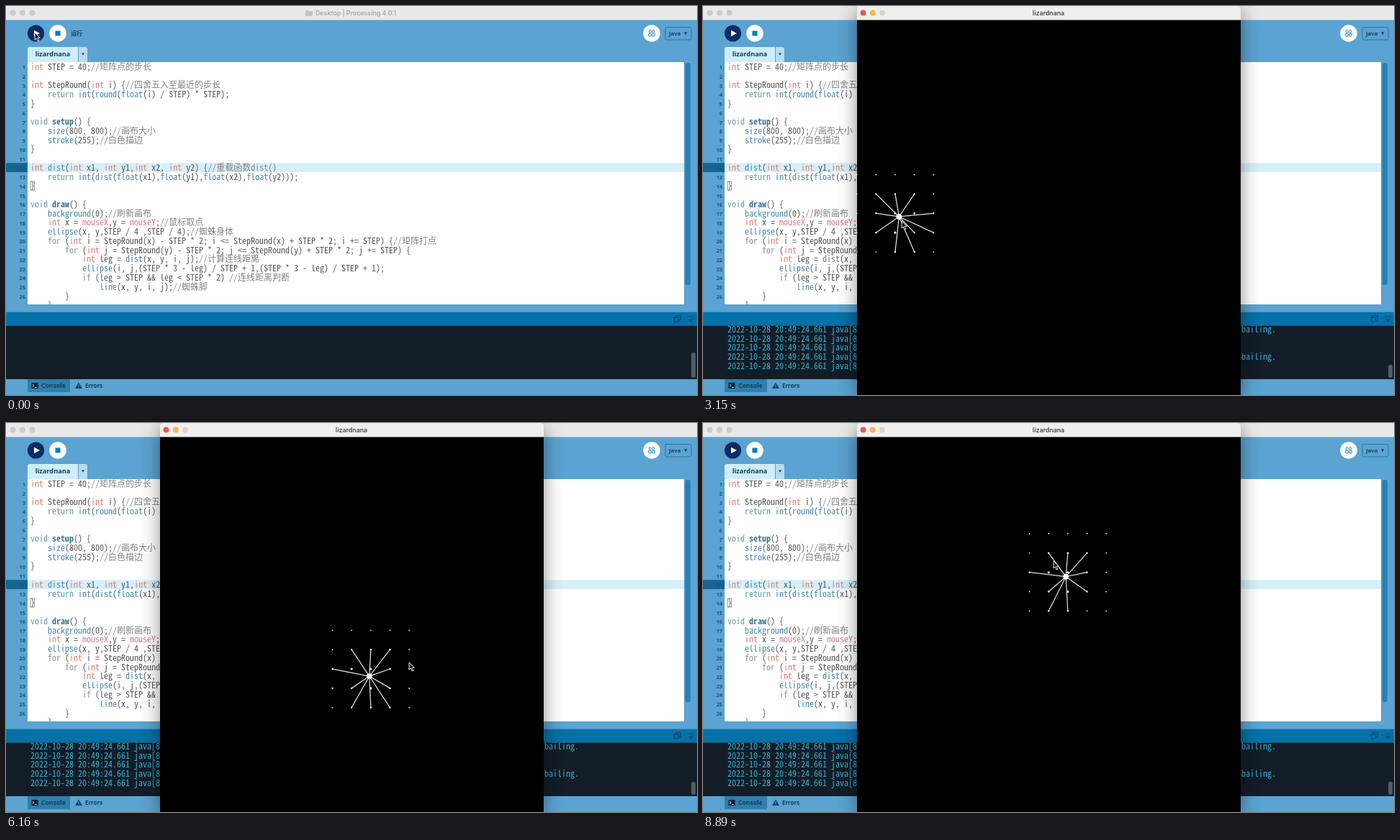
An HTML page for the animation above (8.96 s loop, 960 by 541 pixels).

```html
<!DOCTYPE html>
<html lang="en">
<head>
<meta charset="utf-8">
<title>Spider sketch</title>
<style>
html, body { margin: 0; width: 100%; height: 100%; overflow: hidden; background: #5ba3d1; }
svg { display: block; width: 100%; height: 100%; }
text { white-space: pre; }
.ui { font: 700 8.6px "Open Sans", "Noto Sans CJK SC", sans-serif; fill: #173f61; }
.title { font: 600 8.8px Inter, sans-serif; text-anchor: middle; }
.num { font: 700 7.5px "Open Sans", sans-serif; fill: #1f5378; text-anchor: end; }
.code { font-size: 12px; fill: #565656; }
.cjk { font-family: "Noto Sans CJK SC", "Noto Sans CJK", sans-serif; font-size: 12px; }
.type { fill: #e08170; }
.word { fill: #679ca6; }
.flow { fill: #8d968e; }
.func { fill: #4788ac; }
.main { fill: #41758f; font-weight: 700; }
.var { fill: #d97c8f; }
.note { fill: #838383; }
.log { font-size: 12px; fill: #35b2d3; }
#win { transform-origin: 480px 280px; }
#frame { filter: drop-shadow(0 6px 13px rgba(0, 0, 0, .45)); }
</style>
</head>
<body>
<svg viewBox="0 0 960 541" preserveAspectRatio="none">
  <defs>
    <clipPath id="page"><rect x="30" y="78" width="912" height="337"/></clipPath>
    <clipPath id="view"><rect x="213.5" y="19" width="533.5" height="522"/></clipPath>
  </defs>
  <rect width="960" height="541" fill="#5ba3d1"/>
  <rect width="960" height="19.5" fill="#e9e9e9"/>
  <g fill="#cbcbcb"><circle cx="9.5" cy="9.5" r="4"/><circle cx="23" cy="9.5" r="4"/><circle cx="36.5" cy="9.5" r="4"/></g>
  <path d="M416 6h3.5l1 1.3h5.5v6.7h-10z" fill="#c3c3c3"/>
  <text class="title" x="486" y="12.8" fill="#a9a9a9">Desktop | Processing 4.0.1</text>

  <circle cx="41.5" cy="38" r="11.6" fill="#0b2c63"/>
  <path d="M39 33.8l8 4.2l-8 4.2z" fill="#fff"/>
  <circle cx="72" cy="38" r="11.8" fill="#fff"/>
  <rect x="68.5" y="34.5" width="7" height="7" fill="#0b7dbd"/>
  <text id="hint" class="ui" x="90" y="41.2" style="font-size:8px">运行</text>
  <circle cx="897" cy="38" r="11.8" fill="#fff"/>
  <g fill="none" stroke="#4a9ccc" stroke-width="1.1">
    <rect x="893.5" y="33.5" width="2.6" height="4" rx="1.3"/><rect x="898" y="33.5" width="2.6" height="4" rx="1.3"/>
    <circle cx="894.4" cy="40" r="2"/><circle cx="899.6" cy="40" r="2"/>
  </g>
  <rect x="916" y="29.5" width="36" height="17.5" rx="2" fill="none" stroke="#2b75a4"/>
  <text class="ui" x="921" y="41.2" style="font-size:7.8px">Java</text>
  <path d="M942 36.3h4.4l-2.2 4z" fill="#173f61"/>
  <path d="M30 78v-18q0-3 3-3h67v21z" fill="#d0eefa"/>
  <path d="M101 78v-21h9q3 0 3 3v18z" fill="#b5dcf0"/>
  <path d="M105 65.5h4l-2 3.2z" fill="#173f61"/>
  <text class="ui" x="65" y="70.3" text-anchor="middle" style="font-size:9.2px">lizardnana</text>

  <rect x="30" y="78" width="912" height="337" fill="#fff"/>
  <rect y="218.3" width="30" height="12.7" fill="#14658f"/>
  <rect x="30" y="218.3" width="912" height="12.7" fill="#d6f0fa"/>
  <rect x="34" y="244" width="5.5" height="12" fill="none" stroke="#777" stroke-width=".8"/>
  <rect x="943.5" y="79" width="7.5" height="309" rx="3" fill="#2c7fb1"/>
  <g id="code"></g>

  <rect y="425.7" width="960" height="18.8" fill="#0471a8"/>
  <g fill="none" stroke="#14456a" stroke-width="1.2">
    <rect x="928.5" y="433" width="5.5" height="6"/><path d="M931 433v-2.5h6v6.5h-3M947 432h9M949 436h5l-2.5 3z"/>
  </g>
  <rect y="444.5" width="960" height="75" fill="#131d27"/>
  <g id="log"></g>
  <rect id="thumb" x="952" y="482" width="6" height="35" rx="3" fill="#525c66"/>
  <rect y="519" width="960" height="22" fill="#5ba3d1"/>
  <rect x="30" y="519" width="59" height="18" fill="#2f7fae"/>
  <rect x="35.5" y="524" width="9" height="8" fill="#0d2233"/>
  <path d="M37 526l2 1.8l-2 1.8M40 530.5h3" fill="none" stroke="#d6e8f2" stroke-width=".9"/>
  <text class="ui" x="49" y="531">Console</text>
  <path d="M101 523.5l5 8.5h-10z" fill="#173f61"/>
  <path d="M101 526.5v2.5M101 530v1" stroke="#7cb8dc"/>
  <text class="ui" x="110" y="531" style="font-size:8px">Errors</text>

  <g id="win">
    <path id="frame" d="M214 541V5q0-5 5-5h523q5 0 5 5v536z" fill="#f0efef"/>
    <circle cx="222.5" cy="9.5" r="4" fill="#ea5a4e"/>
    <circle cx="235.8" cy="9.5" r="4" fill="#f5b552"/>
    <circle cx="249" cy="9.5" r="4" fill="#dcd5c8"/>
    <text class="title" x="480" y="12.8" fill="#4a4a4a">lizardnana</text>
    <rect x="214" y="19.5" width="533" height="522" fill="#000"/>
    <g clip-path="url(#view)">
      <path id="legs" fill="none" stroke="#dedede" stroke-width="1.25"/>
      <path id="dots" fill="#fff"/>
    </g>
  </g>
  <path id="mouse" d="M0 0v10l2.3-2l1.8 4l1.8-.8l-1.7-3.9h3.1z" fill="#111" stroke="#fff" stroke-width=".9"/>
</svg>
<script>
const LOOP = 8960, TICK = 70, STEP = 40;
const LOG_AT = 840, OPEN_AT = 980, LEAVE_AT = 1680;
const $ = id => document.getElementById(id);

// half-width face when present, otherwise the same 6px pitch at 10px
const probe = document.createElement('canvas').getContext('2d');
probe.font = '12px "Noto Sans Mono CJK SC", monospace';
const narrow = Math.abs(probe.measureText('M'.repeat(10)).width - 60) < 1;
const mono = narrow ? 'font-family:\'Noto Sans Mono CJK SC\',monospace'
                    : 'font-family:\'Liberation Mono\',monospace;font-size:10px';

const source = `int STEP = 40;//矩阵点的步长

int StepRound(int i) {//四舍五入至最近的步长
    return int(round(float(i) / STEP) * STEP);
}

void setup() {
    size(800, 800);//画布大小
    stroke(255);//白色描边
}

int dist(int x1, int y1,int x2, int y2) {//重载函数dist()
    return int(dist(float(x1),float(y1),float(x2),float(y2)));
}

void draw() {
    background(0);//刷新画布
    int x = mouseX,y = mouseY;//鼠标取点
    ellipse(x, y,STEP / 4 ,STEP / 4);//蜘蛛身体
    for (int i = StepRound(x) - STEP * 2; i <= StepRound(x) + STEP * 2; i += STEP) {//矩阵打点
        for (int j = StepRound(y) - STEP * 2; j <= StepRound(y) + STEP * 2; j += STEP) {
            int leg = dist(x, y, i, j);//计算连线距离
            ellipse(i, j,(STEP * 3 - leg) / STEP + 1,(STEP * 3 - leg) / STEP + 1);
            if (leg > STEP && leg < STEP * 2) //连线距离判断
                line(x, y, i, j);//蜘蛛脚
        }
    }`.split('\n');

const rules = [
  ['note', '//.*'],
  ['func', '\\b(?:int|float)(?=\\()|\\b(?:size|stroke|background|ellipse|line|round|dist)\\b'],
  ['type', '\\bint\\b'],
  ['word', '\\b(?:void|return)\\b'],
  ['flow', '\\b(?:for|if)\\b'],
  ['main', '\\b(?:setup|draw)\\b'],
  ['var', '\\bmouse[XY]\\b']
];
const lexer = new RegExp(rules.map(([name, re]) => `(?<${name}>${re})`).join('|'), 'g');
const escape = s => s.replace(/&/g, '&amp;').replace(/</g, '&lt;');
const span = (cls, s) => `<tspan class="${cls}">${s}</tspan>`;

function paint(line) {
  return escape(line)
    .replace(lexer, (s, ...rest) => {
      const groups = rest[rest.length - 1];
      return span(Object.keys(groups).find(k => groups[k]), s);
    })
    .replace(/[\u4e00-\u9fff]+/g, s => span('cjk', s));
}

$('code').innerHTML = '<g clip-path="url(#page)">' + source.map((line, i) =>
  `<text class="code" style="${mono}" x="34" y="${88.5 + i * 12.76}">${paint(line)}</text>`).join('') + '</g>' +
  source.slice(0, 26).map((_, i) =>
    `<text class="num" x="27" y="${88 + i * 12.76}">${i + 1}</text>`).join('');

const stamp = '2022-10-28 20:49:24.661 java[8213:91467] ';
const long = (stamp + 'The window restoration class could not be found for the saved state archives,').padEnd(119) + 'bailing.';
const short = stamp + 'The window restoration class was requested twice';
$('log').innerHTML = [long, short, short, long, short].map((s, i) =>
  `<text class="log" style="${mono}" x="34" y="${454 + i * 12.7}">${s}</text>`).join('');

// pointer path: time, x, y
const path = [
  [0, 40, 37], [490, 40, 37], [630, 40, 41], [1540, 40, 41], [1680, 58, 50], [1960, 200, 215],
  [2240, 262, 400], [2520, 300, 462], [2660, 620, 470], [2760, 752, 330], [2870, 560, 80],
  [3010, 290, 220], [3080, 272, 293], [3150, 276, 299], [3320, 318, 390], [3500, 322, 230],
  [3640, 260, 125], [3800, 110, 220], [3880, 76, 330], [4080, 130, 505], [4340, 205, 425],
  [4480, 400, 432], [4620, 780, 330], [4760, 660, 115], [4900, 470, 105], [4970, 430, 180],
  [5040, 472, 227], [5110, 471, 226], [5460, 471, 226], [5600, 430, 184], [5740, 376, 240],
  [5980, 430, 366], [6230, 585, 310], [6400, 580, 190], [6540, 480, 126], [6720, 330, 200],
  [6860, 312, 319], [6930, 313, 323], [7280, 385, 372], [7560, 550, 447], [7770, 631, 368],
  [7840, 657, 286], [7980, 560, 124], [8190, 125, 290], [8340, 230, 448], [8680, 500, 350],
  [8820, 504, 214], [8890, 487, 192]
];

// monotone cubic: no overshoot, rests stay still
function slope(i, axis) {
  if (i < 1 || i > path.length - 2) return 0;
  const rate = k => (path[k + 1][axis] - path[k][axis]) / (path[k + 1][0] - path[k][0]);
  const a = rate(i - 1), b = rate(i);
  return a * b <= 0 ? 0 : 2 * a * b / (a + b);
}
function pointer(t) {
  let i = 0;
  while (i < path.length - 2 && path[i + 1][0] <= t) i++;
  const p = path[i], q = path[i + 1], d = q[0] - p[0], u = Math.min(1, (t - p[0]) / d);
  return [1, 2].map(k => {
    const v = 1 - u;
    return v * v * (1 + 2 * u) * p[k] + u * u * (3 - 2 * u) * q[k]
      + d * u * v * (v * slope(i, k) - u * slope(i + 1, k));
  });
}

// the spider trails by one tick and rests while the pointer is outside
const spiders = [[0, 0]];
for (let i = 1; i < LOOP / TICK; i++) {
  const [x, y] = pointer((i - 1) * TICK);
  const inside = x > 214 && x < 747 && y > 20;
  spiders.push(inside ? [Math.round((x - 213.7) / .6662), Math.round((y - 19.6) / .6717)] : spiders[i - 1]);
}

const sx = x => 213.7 + x * .6662, sy = y => 19.6 + y * .6717;
function dot(x, y, size) {
  const r = (size + 1.6) / 2 * .67;
  return `M${sx(x) - r} ${sy(y)}a${r} ${r} 0 1 0 ${2 * r} 0a${r} ${r} 0 1 0 ${-2 * r} 0z`;
}
function drawSpider([x, y]) {
  const snap = v => Math.round(v / STEP) * STEP;
  let dots = dot(x, y, STEP / 4), legs = '';
  for (let i = snap(x) - STEP * 2; i <= snap(x) + STEP * 2; i += STEP)
    for (let j = snap(y) - STEP * 2; j <= snap(y) + STEP * 2; j += STEP) {
      const leg = Math.trunc(Math.hypot(x - i, y - j));
      dots += dot(i, j, Math.trunc((STEP * 3 - leg) / STEP) + 1);
      if (leg > STEP && leg < STEP * 2) legs += `M${sx(x)} ${sy(y)}L${sx(i)} ${sy(j)}`;
    }
  $('dots').setAttribute('d', dots);
  $('legs').setAttribute('d', legs);
}

let last = -1;
function render(now) {
  const n = Math.floor(now % LOOP / TICK), t = n * TICK;
  if (n !== last) {
    last = n;
    const [x, y] = pointer(t);
    const open = Math.max(0, Math.min(1, (t - OPEN_AT + TICK) / (TICK * 3)));
    const logged = t >= LOG_AT;
    $('mouse').setAttribute('transform', `translate(${x} ${y})`);
    $('hint').style.display = t < LEAVE_AT ? '' : 'none';
    $('log').style.display = logged ? '' : 'none';
    $('thumb').setAttribute('y', logged ? 499 : 482);
    $('thumb').setAttribute('height', logged ? 18 : 35);
    $('win').style.display = open ? '' : 'none';
    $('win').style.opacity = open;
    $('win').style.transform = open < 1 ? `scale(${.94 + .06 * open})` : 'none';
    drawSpider(spiders[n]);
  }
  requestAnimationFrame(render);
}
render(performance.now());
</script>
</body>
</html>
```
